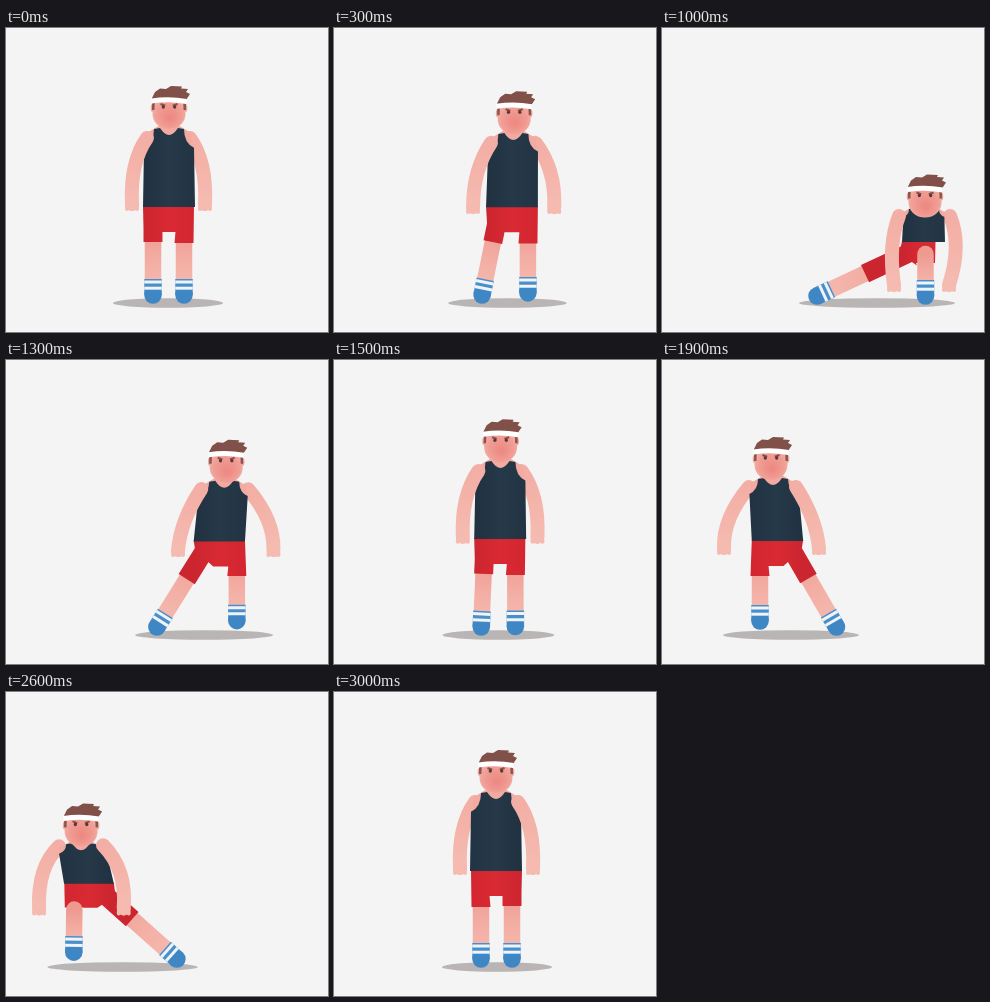
Animation of 322 by 304 pixels, one loop 3100 ms. Source, as an HTML page with a canvas:

```html
<!DOCTYPE html>
<html lang="en">
<head>
<meta charset="utf-8">
<title>Side lunges</title>
<style>
  html, body { margin: 0; width: 322px; height: 304px; overflow: hidden; background: #f4f4f4; }
  canvas { display: block; }
</style>
</head>
<body>
<canvas id="stage" width="322" height="304"></canvas>
<script>
const ctx = document.getElementById('stage').getContext('2d');
const LOOP = 3100, STEP = 100, AXIS = 325;

// Poses of a lunge to the right, from standing to the lowest point.
// Pairs are x, y; hw is the half width of the waist;
// hem is the y of the front hem and crotch, then the back hem's distance from the foot.
const poses = [
  { head: [163, 83], neck: [163, 101], waist: [163, 179], hw: [26],
    armT: [141, 110, 124, 134, 126, 176], armL: [184, 110, 201, 134, 199, 176],
    trail: [147, 200, 147, 267], lead: [178, 200, 178, 267], hem: [215, 204, 53], shadow: [107, 217] },
  { head: [216, 102], neck: [214, 119], waist: [209.5, 181], hw: [25.7],
    armT: [191, 127, 171, 158, 168, 188], armL: [238, 127, 264, 158, 263, 188],
    trail: [195, 190, 150.5, 267], lead: [227, 195, 227, 261], hem: [216, 206, 56], shadow: [128, 264] },
  { head: [249, 135], neck: [249, 151], waist: [241, 191], hw: [25],
    armT: [227, 152, 203, 176, 206, 215], armL: [271, 153, 293, 174, 291.5, 215],
    trail: [224, 203, 154, 267], lead: [256, 217, 256.5, 260], hem: [215, 215, 60], shadow: [133, 283] },
  { head: [263, 171.5], neck: [262, 181], waist: [261.5, 214], hw: [21.5],
    armT: [237, 188, 226, 216, 232, 257], armL: [288, 188, 300, 217, 287, 257],
    trail: [247, 225, 155, 268], lead: [263.5, 226, 263.5, 268], hem: [235, 238, 53], shadow: [137, 293] }
];

// Depth along the poses, one value per step; the second half goes left.
const right = [0, .02, .12, .38, .75, 1.3, 2, 2.5, 2.8, 2.95, 3, 2.65, 1.95, 1.1, .4, .11];
const left = [.03, .16, .5, 1, 1.6, 2.2, 2.65, 2.9, 3, 2.7, 2.04, 1.15, .45, .1, 0];

const spline = (a, b, c, d, u) =>
  b + u / 2 * (c - a + u * (2 * a - 5 * b + 4 * c - d + u * (3 * (b - c) + d - a)));

function poseAt(depth) {
  const i = Math.min(2, Math.floor(depth)), u = depth - i;
  const near = [i - 1, i, i + 1, i + 2].map(k => poses[Math.max(0, Math.min(3, k))]);
  const out = {};
  for (const key in poses[0])
    out[key] = near[1][key].map((_, n) => spline(...near.map(p => p[key][n]), u));
  return out;
}

function poly(points, fill) {
  ctx.beginPath();
  points.forEach(([x, y]) => ctx.lineTo(x, y));
  ctx.closePath();
  ctx.fillStyle = fill;
  ctx.fill();
}

function line(x0, y0, x1, y1, width, color, cap = 'butt') {
  ctx.beginPath();
  ctx.moveTo(x0, y0);
  ctx.lineTo(x1, y1);
  ctx.lineWidth = width;
  ctx.lineCap = cap;
  ctx.strokeStyle = color;
  ctx.stroke();
}

function oval(x, y, rx, ry, fill) {
  ctx.beginPath();
  ctx.ellipse(x, y, rx, ry, 0, 0, 7);
  ctx.fillStyle = fill;
  ctx.fill();
}

function ramp(x0, y0, x1, y1, ...colors) {
  const g = ctx.createLinearGradient(x0, y0, x1, y1);
  colors.forEach((c, i) => g.addColorStop(i / (colors.length - 1), c));
  return g;
}

function leg([hx, hy, fx, fy]) {
  const len = Math.hypot(hx - fx, hy - fy);
  const along = d => [fx + (hx - fx) / len * d, fy + (hy - fy) / len * d];
  line(hx, hy, ...along(10), 16.5, ramp(hx, hy, fx, fy, '#ee9a91', '#f3aea4', '#f5bbb1'), 'round');
  line(...along(16), fx, fy, 17.5, '#4a8fca');
  oval(fx, fy, 8.75, 8.75, '#3f86c5');
  for (const d of [13, 6.8]) line(...along(d + 1.5), ...along(d - 1.5), 17.5, '#eff4f9');
  return along;
}

function arm([sx, sy, ex, ey, hx, hy]) {
  ctx.beginPath();
  ctx.moveTo(sx, sy);
  ctx.quadraticCurveTo(ex, ey, hx, hy);
  ctx.lineWidth = 14;
  ctx.lineCap = 'round';
  ctx.strokeStyle = ramp(sx, sy, hx, hy, '#f3aea5', '#f4b4aa', '#f5bbb1');
  ctx.stroke();
  for (const d of [-5, 0, 5]) line(hx + d * .9, hy, hx + d, hy + 5, 4, '#f5bab0', 'round');
}

function shorts(p, along) {
  const [wx, wy] = p.waist, hw = p.hw[0], [hem, crotch, back] = p.hem;
  const [tx, ty] = p.trail, lx = p.lead[0];
  const red = ramp(wx - hw, 0, wx + hw, 0, '#cb2530', '#d92a33', '#d32630');
  line(tx, ty, ...along(back), 19, red);
  poly([[wx - hw, wy - 1], [Math.min(wx + hw, lx + 10), wy - 1], [lx + 9.5, hem], [lx - 9.5, hem],
        [lx - 8.5, crotch], [tx + 8.5, crotch], [tx - 9.5, ty]], red);
}

function torso(p) {
  const [nx, ny] = p.neck, [wx, wy] = p.waist, hw = p.hw[0];
  const drop = (wy - ny) * .24, cx = nx + (wx - nx) * .24;
  poly([[nx - 9, ny - 4], [nx + 9, ny - 4], [nx + 22, ny + 4], [cx + hw - 2, ny + drop + 4],
        [cx - hw + 2, ny + drop + 4], [nx - 22, ny + 4]], '#f2aaa1');
  ctx.beginPath();
  ctx.moveTo(nx - 15, ny);
  ctx.quadraticCurveTo(nx - 15, ny + drop * .75, cx - hw + 1, ny + drop);
  ctx.lineTo(wx - hw, wy);
  ctx.lineTo(wx + hw, wy);
  ctx.lineTo(cx + hw - 1, ny + drop);
  ctx.quadraticCurveTo(nx + 15, ny + drop * .75, nx + 15, ny);
  ctx.lineTo(nx + 9, ny - 1);
  ctx.quadraticCurveTo(nx, ny + 13, nx - 9, ny - 1);
  ctx.closePath();
  ctx.fillStyle = ramp(wx - hw, 0, wx + hw, 0, '#203140', '#263948', '#223443');
  ctx.fill();
}

function head(x, y) {
  ctx.save();
  ctx.translate(x, y);
  oval(-16.5, -3, 1.8, 4, '#f0a79e');
  oval(16.5, -3, 1.8, 4, '#f0a79e');
  poly([[-16, 0], [-17, -13], [-14, -19], [-9, -22.5], [-3, -22], [2, -25], [13, -24.5], [12, -22.5],
        [19, -22], [17, -19], [21, -17], [17, -11], [16, 0]], '#805049');
  const skin = ctx.createRadialGradient(1, 7, 2, 0, 2, 20);
  skin.addColorStop(0, '#ed8a83');
  skin.addColorStop(.6, '#f09e95');
  skin.addColorStop(1, '#f5b7ac');
  ctx.beginPath();
  ctx.moveTo(-15, -11);
  ctx.lineTo(15, -11);
  ctx.lineTo(16.5, 0);
  ctx.bezierCurveTo(17.5, 12, 9, 18, 0, 18);
  ctx.bezierCurveTo(-9, 18, -17.5, 12, -16.5, 0);
  ctx.closePath();
  ctx.fillStyle = skin;
  ctx.fill();
  for (const s of [-1, 1]) {
    line(s * 15.5, -8, s * 15.8, -1, 2.5, '#8a554c');
    line(s * 8.5, -7, s * 3.8, -5.3, 2, '#8a4f48');
    oval(s * 5.7, -4, 1.6, 1.8, '#54383a');
  }
  ctx.beginPath();
  ctx.moveTo(-17.5, -10);
  ctx.quadraticCurveTo(0, -12.5, 17.5, -9.5);
  ctx.lineWidth = 5;
  ctx.lineCap = 'butt';
  ctx.strokeStyle = '#fff';
  ctx.stroke();
  ctx.restore();
}

function draw(step) {
  const toLeft = step >= right.length;
  const depth = toLeft ? left[step - right.length] : right[step];
  const p = poseAt(depth), bent = depth > 1.5;
  ctx.fillStyle = '#f4f4f4';
  ctx.fillRect(0, 0, 322, 304);
  ctx.save();
  if (toLeft) ctx.transform(-1, 0, 0, 1, AXIS, 0);
  const [a, b] = p.shadow;
  oval((a + b) / 2, 275, (b - a) / 2, 4.8, '#bab5b5');
  const along = leg(p.trail);
  if (!bent) leg(p.lead);
  shorts(p, along);
  if (bent) leg(p.lead);
  arm(p.armL);
  torso(p);
  arm(p.armT);
  ctx.restore();
  head(toLeft ? AXIS - p.head[0] : p.head[0], p.head[1]);
}

const start = performance.now();
function tick() {
  draw(Math.floor((performance.now() - start) % LOOP / STEP));
  requestAnimationFrame(tick);
}
tick();
</script>
</body>
</html>
```
